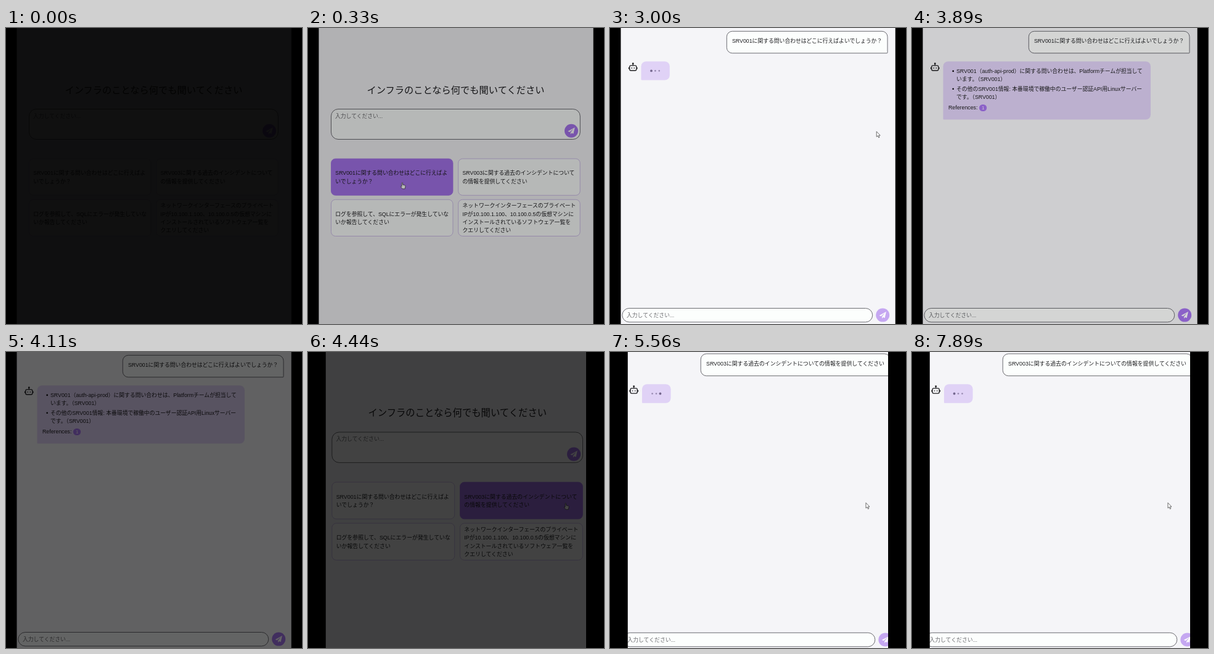
An HTML page for the animation above (8 s loop, 480x480 px).

```html
<!DOCTYPE html>
<html lang="ja">
<head>
<meta charset="utf-8">
<style>
  html, body { margin: 0; width: 100%; height: 100%; overflow: hidden; background: #000; }
  svg { display: block; width: 100vw; height: 100vh; }
  text { font: 8.8px 'Liberation Sans', Arial, 'Noto Sans CJK JP', 'Noto Sans CJK', sans-serif;
    fill: #1c1c1f; white-space: pre; text-spacing-trim: space-all; }
  .title { font-size: 15.25px; font-weight: 500; text-anchor: middle; }
  .hint { fill: #68686c; }
  .field { fill: #fcfefd; stroke: #5c5c62; stroke-width: .9; }
  .card { fill: #fcfefd; stroke: #c5b0e6; stroke-width: .8; }
  .card.hot { fill: #a674ee; stroke: #a674ee; }
  .bot { fill: #e0d2f6; }
  .purple { fill: #a674ee; }
  .cursor { fill: #fff; stroke: #333; stroke-width: .7; stroke-linejoin: round; }
</style>
</head>
<body>
<svg viewBox="0 0 480 480">
  <defs>
    <g id="send">
      <circle r="11" class="purple"/>
      <path d="M5.7-5.5-5.7.6-2.7 1.9 3.7-3.8-1.2 2.6V5.6L.6 3.4 3.4 4.6z" fill="#fff"/>
    </g>
  </defs>
  <rect width="480" height="480" fill="#f5f5f8"/>
  <g id="view">
    <g id="home">
      <text class="title" x="239.5" y="105.6">インフラのことなら何でも聞いてください</text>
      <rect class="field" x="37.5" y="131.5" width="403.8" height="49" rx="11.5"/>
      <text id="entry" x="44" y="145.5"></text>
      <use href="#send" x="427" y="166.8"/>
      <g id="cards"></g>
    </g>
    <g id="chat">
      <path id="bubble" class="field"/>
      <text id="ask" y="24"></text>
      <g fill="none" stroke="#1c1c1f" stroke-width="1.3">
        <rect x="31.8" y="60.8" width="11" height="8.2" rx="2"/>
        <path d="M37.3 60.8V58M30.6 63.8v2.6M44 63.8v2.6"/>
        <circle cx="37.3" cy="57.7" r=".8"/>
        <path d="M35.3 64.1v1.7M39.3 64.1v1.7"/>
      </g>
      <g id="wait">
        <path id="waitBox" class="bot"/>
        <g id="dots" fill="#75688f"></g>
      </g>
      <g id="answer">
        <path id="answerBox" class="bot"/>
        <circle cx="66.7" cy="69.9" r="1.3"/>
        <circle cx="66.7" cy="98.7" r="1.3"/>
        <text x="72" y="72.7">SRV001（auth-api-prod）に関する問い合わせは、Platformチームが担当して</text>
        <text x="72" y="86">います。<tspan dx="-4.4">（SRV001）</tspan></text>
        <text x="72" y="101.5">その他のSRV001情報: 本番環境で稼働中のユーザー認証API用Linuxサーバー</text>
        <text x="72" y="114.7">です。<tspan dx="-4.4">（SRV001）</tspan></text>
        <text x="59" y="132">References:</text>
        <rect class="purple" x="109" y="124" width="12.2" height="11" rx="5.5"/>
        <text x="115.1" y="132" style="font-size:7px;fill:#fff;text-anchor:middle">1</text>
      </g>
      <rect class="field" x="19.9" y="454.5" width="405.8" height="22.4" rx="11.2"/>
      <text class="hint" x="27" y="468.7">入力してください...</text>
      <use id="chatSend" href="#send" x="442.2" y="465.6"/>
    </g>
    <g id="cursor">
      <path id="arrow" class="cursor" d="M0 0V8.6L2 6.9 3.4 10 4.8 9.4 3.4 6.4H6z"/>
      <path id="hand" class="cursor" d="M2 7V1.2Q2.8 0 3.6 1.2V4.2L7.2 5Q8.2 5.5 8 7L7.2 10.8H3.2L.3 7.5Q.3 6 2 7z"/>
    </g>
  </g>
  <rect id="left" height="480"/>
  <rect id="right" width="40" height="480"/>
  <rect id="shade" width="480" height="480"/>
</svg>
<script>
const LOOP = 8000, CUT = 4310, FADE = 500, DOT_PERIOD = 1000;
const $ = id => document.getElementById(id);
const show = (id, on) => $(id).style.display = on ? '' : 'none';
const clamp = v => Math.max(0, Math.min(1, v));
const set = (el, attrs) => { for (const k in attrs) el.setAttribute(k, attrs[k]); return el; };
const add = (parent, tag, attrs) =>
  parent.appendChild(set(document.createElementNS('http://www.w3.org/2000/svg', tag), attrs));

// Rounded box with its own radius for the two lower corners
function box(x, y, right, bottom, r, br, bl) {
  return `M${x + r} ${y}H${right - r}a${r} ${r} 0 0 1 ${r} ${r}V${bottom - br}a${br} ${br} 0 0 1 ${-br} ${br}` +
    `H${x + bl}a${bl} ${bl} 0 0 1 ${-bl} ${-bl}V${y + r}a${r} ${r} 0 0 1 ${r} ${-r}z`;
}

const cards = [
  [37.5, 212, ['SRV001に関する問い合わせはどこに行えばよ', 'いでしょうか？']],
  [243.7, 212, ['SRV003に関する過去のインシデントについて', 'の情報を提供してください']],
  [37.5, 278.2, ['ログを参照して、SQLにエラーが発生していな', 'いか報告してください']],
  [243.7, 278.2, ['ネットワークインターフェースのプライベート', 'IPが10.100.1.100、10.100.0.5の仮想マシンに',
    'インストールされているソフトウェア一覧を', 'クエリしてください']]
].map(([x, y, lines]) => {
  const rect = add($('cards'), 'rect', { class: 'card', x, y, width: 197.5, height: 59.3, rx: 7 });
  lines.forEach((line, i) => add($('cards'), 'text', {
    x: x + 6.8, y: y + 33 + (i - (lines.length - 1) / 2) * 13.2
  }).textContent = line);
  return { rect, question: lines.join('') };
});

const dots = [67, 73.4, 79.8].map(cx => add($('dots'), 'circle', { cx, cy: 69.4 }));
set($('waitBox'), { d: box(50.5, 54.2, 96.8, 84.6, 8, 8, 1) });
set($('answerBox'), { d: box(50.5, 54.2, 387, 148.6, 8, 8, 1) });

const scenes = [
  { card: 0, start: -30, hover: [330, 640], fill: 580, chat: 970, answer: 3500, phase: 0,
    view: '', bars: [17.5, 462.7], textX: 198,
    path: [[330, 150, 250], [600, 150, 250], [850, 432.2, 167.8]] },
  { card: 1, start: CUT, hover: [CUT, 5150], fill: 5000, chat: 5200, answer: Infinity, phase: 890,
    view: 'matrix(1.007 0 0 1.007 1.1 -2.4)', bars: [28.8, 451], textX: 153.8,
    path: [[CUT, 411, 245.2]] }
];

function along(path, t) {
  const next = path.findIndex(p => p[0] > t);
  if (next < 1) return path[next < 0 ? path.length - 1 : 0].slice(1);
  const [a, b] = [path[next - 1], path[next]];
  const k = (t - a[0]) / (b[0] - a[0]), e = k * k * (3 - 2 * k);
  return [a[1] + (b[1] - a[1]) * e, a[2] + (b[2] - a[2]) * e];
}

function draw(t) {
  const s = scenes[t < CUT ? 0 : 1];
  const { question } = cards[s.card];
  const chatting = t >= s.chat, filled = t >= s.fill, answered = t >= s.answer;
  const hot = !chatting && t >= s.hover[0] && t < s.hover[1];

  set($('view'), { transform: s.view });
  set($('left'), { width: s.bars[0] });
  set($('right'), { x: s.bars[1] });
  show('home', !chatting);
  show('chat', chatting);
  show('wait', !answered);
  show('answer', answered);

  cards.forEach((c, i) => c.rect.classList.toggle('hot', hot && i === s.card));
  $('entry').textContent = filled ? question : '入力してください...';
  $('entry').classList.toggle('hint', !filled);
  $('ask').textContent = question;
  set($('ask'), { x: s.textX });
  set($('bubble'), { d: box(s.textX - 8.7, 5.3, 450, 40.8, 9, 1, 9) });
  set($('chatSend'), { opacity: answered ? 1 : .6 });

  dots.forEach((dot, i) => {
    const wave = Math.cos(2 * Math.PI * ((t - s.phase) / DOT_PERIOD - i / 3));
    set(dot, { r: 1.5 + .4 * wave, opacity: .8 + .2 * wave });
  });

  const [x, y] = along(s.path, t);
  show('cursor', t >= s.path[0][0] && !answered);
  show('arrow', !hot);
  show('hand', hot);
  set($('cursor'), { transform: `translate(${x} ${y})` });

  const light = Math.min((t - s.start) / FADE, t < CUT ? (CUT - t) / FADE : 1);
  set($('shade'), { opacity: 1 - clamp(light) });
}

function tick() {
  draw(performance.now() % LOOP);
  requestAnimationFrame(tick);
}
tick();
</script>
</body>
</html>
```
